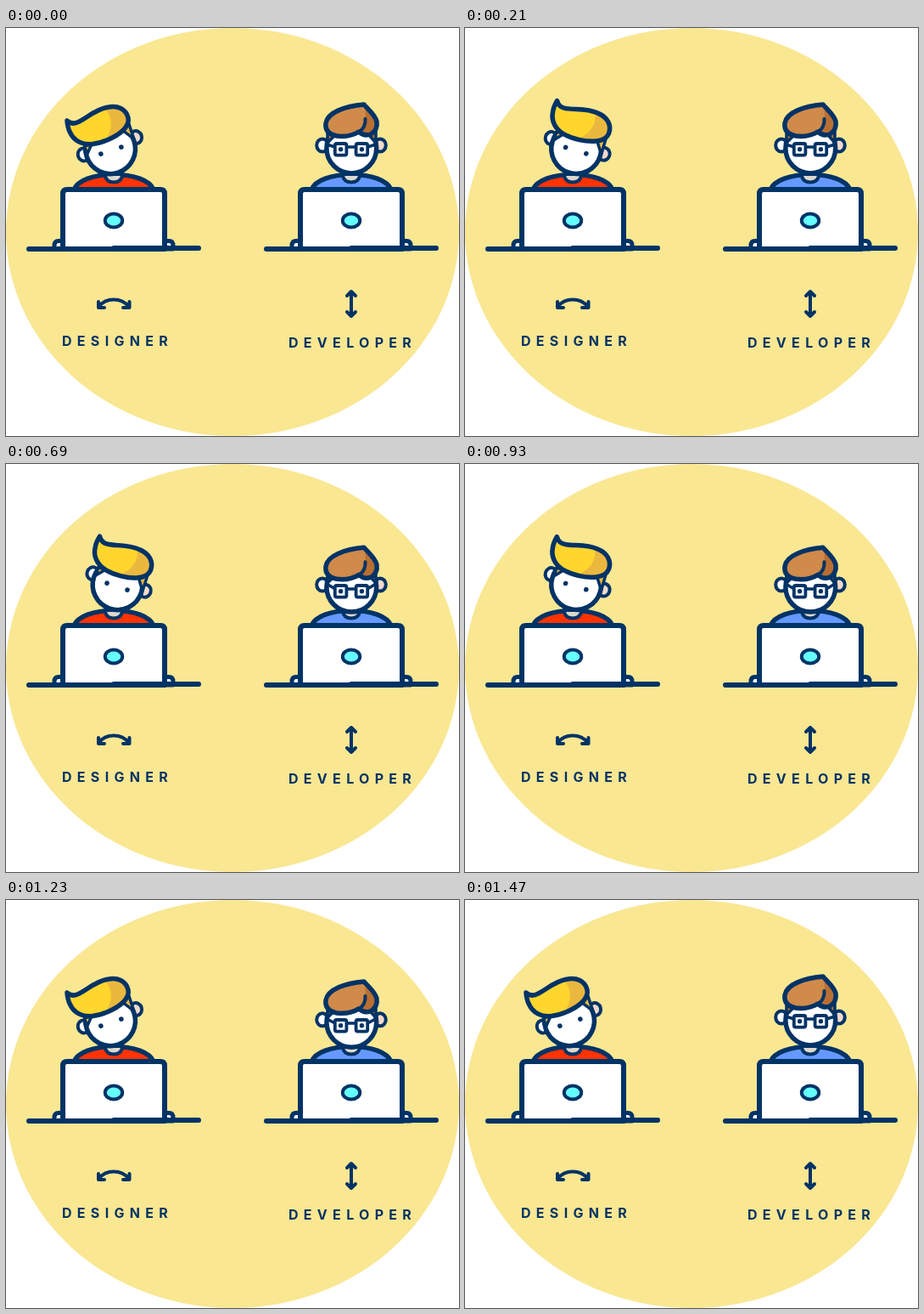
Write an HTML page with a canvas that moves like this. It is 534 px wide and 480 px high and loops after 1.8 s.

```html
<!DOCTYPE html>
<html lang="en">
<head>
<meta charset="utf-8">
<title>Designer and developer</title>
<style>
  html, body { margin: 0; width: 100%; height: 100%; overflow: hidden; background: #fff; }
  canvas { display: block; }
</style>
</head>
<body>
<canvas id="stage" width="534" height="480"></canvas>
<script>
const ctx = document.getElementById('stage').getContext('2d');
const LOOP = 1800, STEP = 30, MOVE = 270;
const NAVY = '#003366', WHITE = '#fff', SAND = '#fae792';
const EAR_SHADE = '#f3d9cb', NECK = '#ddd8cf';
const TILT = 18.4 * Math.PI / 180;

const shoulders = new Path2D('M80 190C85 179 103 172.500 127 172.500C151 172.500 169 179 174 190Z');
const neck = new Path2D('M117 172V174C118 179 122 181.500 127 181.500C132 181.500 136 179 137 174V172Z');
const hands = new Path2D('M57 260V256Q57 250.500 62 250.500H67V260ZM197 260V256Q197 250.500 192 250.500H187V260Z');
const screen = new Path2D('M67 260V195Q67 190 72 190H182Q187 190 187 195V260Z');

const quiff = new Path2D('M-38 -61C-35 -56 -30 -54.500 -25 -55.500C-14 -57 -2 -63 12 -61' +
  'C24.500 -60 32 -52 31.500 -42C31 -36 27 -32 20 -29C9 -24 -8 -23.500 -18 -25.500' +
  'C-30 -28 -38 -36 -39 -47C-40 -53 -39 -57 -38 -61Z');
const quiffShade = new Path2D('M6 -66C15 -52 14 -36 -6 -22H40V-66Z');
const quiffLocks = new Path2D('M21 -29L30 -36L30 -16ZM-19 -26H-28L-28 -16Z');

const crest = new Path2D('M422 90C427 96 435 102 437 110C438 117 435 122 430 125' +
  'C424 127 419 125 416 122C408 127 398 128 390 127C380 125 376 120 377 112C379 99 400 92 422 90Z');
const crestShade = new Path2D('M421 86C425 97 426 112 416 123L430 130H445V86Z');
const crestFold = new Path2D('M423.500 107C424 114 421 119 416 122.500');
const crestLocks = new Path2D('M379 121L387 127L379 135ZM436 119L428 126L436 135Z');

function paint(path, fill, width = 5.5, line = NAVY) {
  if (fill) { ctx.fillStyle = fill; ctx.fill(path); }
  if (width) { ctx.strokeStyle = line; ctx.lineWidth = width; ctx.stroke(path); }
}

function oval(x, y, rx, ry, fill, width) {
  const path = new Path2D();
  path.ellipse(x, y, rx, ry, 0, 0, 7);
  paint(path, fill, width);
}

function box(x, y, w, h, r, fill, width) {
  const path = new Path2D();
  path.roundRect(x, y, w, h, r);
  paint(path, fill, width);
}

function line(d, width) { paint(new Path2D(d), null, width); }

function at(x, y, draw, angle = 0) {
  ctx.save();
  ctx.translate(x, y);
  ctx.rotate(angle);
  draw();
  ctx.restore();
}

function hair(outline, shade, light, dark) {
  paint(outline, light, 0);
  ctx.save();
  ctx.clip(outline);
  paint(shade, dark, 0);
  ctx.restore();
  paint(outline, null);
}

function torso(color) {
  paint(shoulders, color);
  paint(neck, NECK, 4);
}

function laptop() {
  paint(hands, WHITE, 5);
  paint(screen, WHITE, 6);
  line('M27 260H127V259H227', 6);
  oval(127, 226.5, 10.2, 8, '#66ffff', 4);
}

function ears(left, right, y) {
  oval(left, y, 6.8, 7.5, WHITE, 4);
  oval(right, y, 6.8, 7.5, EAR_SHADE, 4);
}

function designerHead() {
  ears(-32, 33, -17);
  oval(0, -13.5, 29.4, 29.4, WHITE, 5.5);
  paint(quiffLocks, '#ebb83f', 3.5);
  oval(-12.5, -11.4, 2.8, 2.8, NAVY, 0);
  oval(12.8, -11.4, 2.8, 2.8, NAVY, 0);
  hair(quiff, quiffShade, '#ffd62e', '#ebb83f');
}

// Hair and glasses travel further than the skull, which reads as a nod.
function developerHead(nod) {
  const earY = 138 + 4 * nod, lensY = 136 + 7 * nod, lens = 13.6;
  ears(373, 441, earY);
  oval(407.3, 141.5 + 3.2 * nod, 29.4, 29.4, WHITE, 5.5);
  at(0, 5 * nod, () => paint(crestLocks, '#b96f31', 3.5));
  line(`M378 ${earY - 1}L388 ${lensY + 4}M402 ${lensY + 4}H412M426 ${lensY + 4}L436 ${earY - 1}`, 3.5);
  for (const x of [387.8, 412.6]) {
    box(x, lensY, lens, lens, 2, WHITE, 3.8);
    oval(x + lens / 2, lensY + lens / 2, 2.7, 2.7, NAVY, 0);
  }
  at(0, 8.3 * nod, () => {
    hair(crest, crestShade, '#d08a4a', '#b96f31');
    paint(crestFold, null, 4);
  });
}

function labels() {
  line('M109 328C118 316.500 136 316.500 145 328M109 322V329H116M145.500 322V329H138', 4);
  line('M407 310V339M402 315L407 310L412 315M402 334L407 339L412 334', 4);
  ctx.fillStyle = NAVY;
  ctx.font = '700 16px Inter, sans-serif';
  ctx.letterSpacing = '6.3px';
  ctx.fillText('DESIGNER', 66, 374);
  ctx.fillText('DEVELOPER', 333, 376);
}

function ease(t) {
  t = Math.min(1, Math.max(0, t));
  return t < 0.5 ? 4 * t ** 3 : 1 - 4 * (1 - t) ** 3;
}

function swing(time, out, back) {
  return ease((time - out) / MOVE) - ease((time - back) / MOVE);
}

function draw(time) {
  ctx.fillStyle = WHITE;
  ctx.fillRect(0, 0, 534, 480);
  oval(267, 240, 267, 240, SAND, 0);

  torso('#ff3300');
  at(127.3, 155, designerHead, TILT * (2 * swing(time, 0, 868) - 1));
  laptop();

  at(280, 0, () => torso('#6699ff'));
  developerHead(swing(time, 235, 1118));
  at(280, 0, laptop);

  labels();
}

ctx.lineCap = ctx.lineJoin = 'round';
function tick() {
  const time = performance.now() % LOOP;
  draw(Math.floor(time / STEP) * STEP);
  requestAnimationFrame(tick);
}
tick();
</script>
</body>
</html>
```
